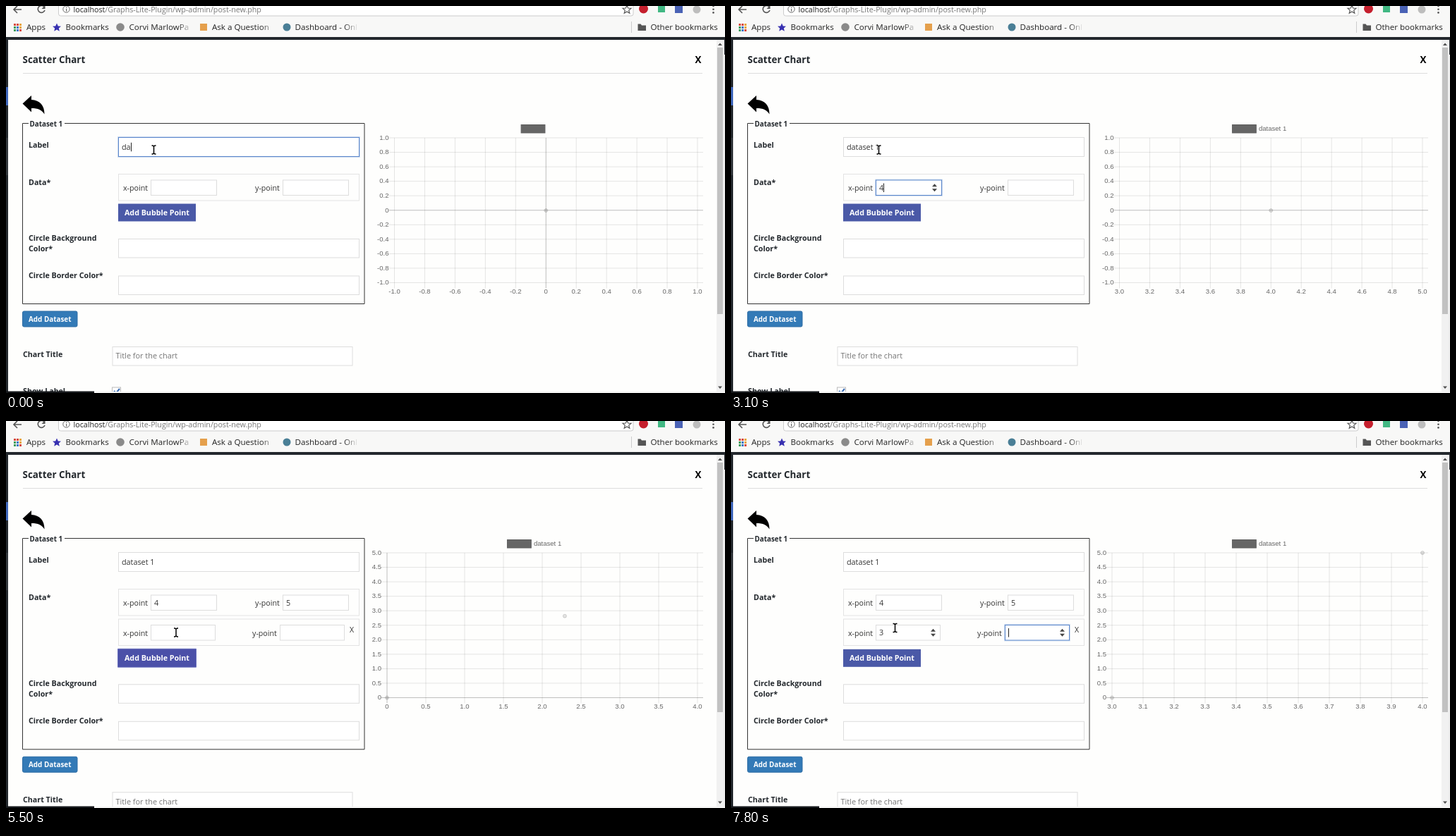
Write an HTML page that moves like this. It is 1019 px wide and 549 px high and loops after 8000 ms.

```html
<!DOCTYPE html>
<html lang="en">
<head>
<meta charset="utf-8">
<title>Scatter chart form</title>
<style>
  html, body { margin: 0; width: 100%; height: 100%; overflow: hidden; background: #fefefd; }
  svg { display: block; }
  text { font: 10.7px "Open Sans", "Noto Sans", sans-serif; fill: #333; white-space: pre; }
  .bold { font-weight: 700; fill: #23282d; }
  .bar { font-size: 11.6px; fill: #222; }
  .tick { font: 9.55px "Liberation Sans", Arial, sans-serif; fill: #666; }
</style>
</head>
<body>
<svg width="1019" height="549" viewBox="0 0 1019 549">
  <defs>
    <linearGradient id="fade">
      <stop offset="0" stop-color="#f8f8f7" stop-opacity="0"/>
      <stop offset="1" stop-color="#f8f8f7"/>
    </linearGradient>
  </defs>
  <g id="page"></g>
  <g id="browser"></g>
  <g id="pointer"></g>
</svg>
<script>
const LOOP = 8000;
const ROW_SHIFT = 43.3;
const FIELD_FONT = '10.8px "Open Sans", "Noto Sans", sans-serif';
const TICK_FONT = '9.55px "Liberation Sans", Arial, sans-serif';
const POINT_START = 5467;
const POINT_TIME = 1000;

// Each entry changes part of the state from its time on.
const steps = [
  [0, { label: 'da', legend: '', x1: '', y1: '', x2: '', focus: 'label', caret: true,
        row: false, glow: false, hover: false, spell: false,
        xAxis: [-1, 1, 10], yAxis: [-1, 1, 10], left: 550.5 }],
  [300, { label: 'dat' }],
  [400, { label: 'data' }],
  [500, { legend: 'data' }],
  [800, { label: 'datas' }],
  [900, { label: 'datase', legend: 'datase' }],
  [1100, { label: 'dataset' }],
  [1200, { legend: 'dataset' }],
  [1300, { label: 'dataset ', spell: true }],
  [1500, { label: 'dataset 1' }],
  [1700, { legend: 'dataset 1' }],
  [2000, { focus: 'x1', spell: false }],
  [2500, { caret: false }],
  [3000, { x1: '4', caret: true }],
  [3100, { xAxis: [3, 5, 10] }],
  [3400, { focus: 'y1' }],
  [4000, { caret: false }],
  [4300, { y1: '5', caret: true }],
  [4500, { yAxis: [4, 6, 10], left: 547.5 }],
  [4900, { glow: true }],
  [5300, { focus: '' }],
  [5400, { row: true }],
  [POINT_START, { xAxis: [0, 4, 8], yAxis: [0, 5, 10], left: 540 }],
  [5800, { hover: true }],
  [6000, { focus: 'x2', caret: true, glow: false }],
  [6500, { caret: false }],
  [7100, { caret: true }],
  [7500, { x2: '3' }],
  [7600, { xAxis: [3, 4, 10] }],
  [7800, { focus: 'y2' }]
];

const mousePath = [
  [0, 209.5, 204], [4500, 209.5, 204], [4700, 181, 262], [4900, 194, 288],
  [5300, 241, 300], [5700, 241, 300], [6000, 232.5, 293.5]
];

const ruler = document.createElement('canvas').getContext('2d');
function textWidth(str, font) {
  ruler.font = font;
  return ruler.measureText(str).width;
}

const rect = (x, y, w, h, fill, more = '') =>
  `<rect x="${x}" y="${y}" width="${w}" height="${h}" fill="${fill}" ${more}/>`;
const box = (x, y, w, h, stroke, fill = 'none') =>
  rect(x + .5, y + .5, w - 1, h - 1, fill, `stroke="${stroke}"`);
const line = (x1, y1, x2, y2, stroke, width = 1) =>
  `<path d="M${x1} ${y1}L${x2} ${y2}" stroke="${stroke}" stroke-width="${width}"/>`;
const text = (x, y, str, cls = '', more = '') =>
  `<text x="${x}" y="${y}" class="${cls}" ${more}>${str}</text>`;
const path = (d, fill, more = '') => `<path d="${d}" fill="${fill}" ${more}/>`;
const dot = (x, y, r, fill, more = '') =>
  `<circle cx="${x}" cy="${y}" r="${r}" fill="${fill}" ${more}/>`;
const size = px => `style="font-size:${px}px"`;

function stateAt(t) {
  return Object.assign({}, ...steps.filter(s => s[0] <= t).map(s => s[1]));
}

function mouseAt(t) {
  const i = mousePath.findIndex(p => p[0] > t);
  if (i < 0) return mousePath[mousePath.length - 1].slice(1);
  const [a, b] = [mousePath[i - 1], mousePath[i]];
  const u = (t - a[0]) / (b[0] - a[0]);
  return [1, 2].map(k => a[k] + (b[k] - a[k]) * u);
}

function field(x, y, w, h, value = '', focused = false, caret = false, spin = false) {
  const base = y + h / 2 + 3.8;
  let out = box(x, y, w, h, focused ? '#5b87cc' : '#ddd', '#fff');
  if (focused) out += rect(x - .3, y - .3, w + .6, h + .6, 'none', 'stroke="#5b87cc" stroke-opacity=".35"');
  out += text(x + 5, base, value, '', size(10.8));
  if (focused && caret) {
    const cx = Math.round(x + 5 + textWidth(value, FIELD_FONT)) + .5;
    out += line(cx, base - 10, cx, base + 2.5, '#222');
  }
  if (spin) {
    const sx = x + w - 10.5, sy = y + h / 2;
    out += path(`M${sx - 3.5} ${sy - 1.5}h7l-3.5 -4zM${sx - 3.5} ${sy + 1.5}h7l-3.5 4z`, '#444');
  }
  return out;
}

function pointRow(s, n, y) {
  const first = n === 1;
  const w = first ? 94 : 92, yx = first ? 392 : 388;
  const input = (axis, x) => {
    const key = axis + n, focused = s.focus === key;
    const spin = focused || (key === 'x2' && s.hover);
    return field(x, y + 8.5, w, 22.5, s[key], focused, s.caret, spin);
  };
  return box(159, y, 342, 38.5, '#e3e3e3') +
    text(166, y + 24, 'x-point') + input('x', 205) +
    text(yx - 39, y + 24, 'y-point') + input('y', yx) +
    (first ? '' : text(487, y + 19, 'X', '', size(10.5)));
}

function form(s) {
  const d = s.row ? ROW_SHIFT : 0;
  let out = path(`M32 166.5H23.5V${422.5 + d}H508V166.5H83`, 'none', 'stroke="#333"') +
    text(33.5, 170.5, 'Dataset 1', 'bold', size(9.85)) +
    text(32, 201, 'Label', 'bold') +
    field(159, 186, 342, 28, s.label, s.focus === 'label', s.caret);
  if (s.spell) {
    const end = 164 + textWidth('dataset', FIELD_FONT);
    out += `<path d="M164 205.5H${end}" stroke="#e33" stroke-dasharray="1.6 1"/>`;
  }
  out += text(32, 254, 'Data*', 'bold') + pointRow(s, 1, 238);
  if (s.row) out += pointRow(s, 2, 280.5);
  if (s.glow) out += rect(158, 279.5 + d, 112, 27, '#6a70bd', 'rx="1"');
  out += rect(159, 280.5 + d, 110, 25, s.glow ? '#4b50a8' : '#4a59a7') +
    text(168, 297 + d, 'Add Bubble Point', 'bold', 'style="fill:#fff"') +
    text(32, 333 + d, 'Circle Background', 'bold') +
    text(32, 347.5 + d, 'Color*', 'bold') +
    field(159, 330 + d, 342, 27.5) +
    text(32, 385.5 + d, 'Circle Border Color*', 'bold') +
    field(159, 382.5 + d, 342, 27.5) +
    rect(23.5, 433 + d, 77.5, 22, '#337ab7', 'rx="2" stroke="#2e6da4"') +
    text(32, 447.8 + d, 'Add Dataset', 'bold', 'style="fill:#fff;font-size:9.9px"') +
    text(24, 498 + d, 'Chart Title', 'bold') +
    field(150.5, 483 + d, 341, 27.5) +
    text(155.5, 500.2 + d, 'Title for the chart', '', 'style="fill:#757575;font-size:10.9px"') +
    text(24, 550 + d, 'Show Label', 'bold') +
    box(150, 540.5 + d, 13, 13, '#bbb', '#fff') +
    path(`M153 ${546 + d}l3 3 5 -6`, 'none', 'stroke="#3a6db5" stroke-width="2"');
  return out;
}

function chart(s, t) {
  const top = 187, bottom = 392.5, right = 980, { left } = s;
  const ticks = ([min, max, n]) => Array.from({ length: n + 1 }, (_, i) => {
    const v = min + (max - min) * i / n;
    const zero = Math.abs(v) < 1e-9;
    return { u: i / n, name: zero ? '0' : v.toFixed(1), ink: `rgba(0,0,0,${zero ? .25 : .1})` };
  });
  let out = '';
  for (const k of ticks(s.xAxis)) {
    const x = left + (right - left) * k.u;
    out += line(x, top, x, bottom + 8, k.ink) +
      text(x, 408, k.name, 'tick', 'text-anchor="middle"');
  }
  for (const k of ticks(s.yAxis)) {
    const y = bottom + (top - bottom) * k.u;
    out += line(left - 8, y, 988, y, k.ink) +
      text(left - 8, y + 2.8, k.name, 'tick', 'text-anchor="end"');
  }
  const x0 = 749 - (37.8 + textWidth(s.legend, TICK_FONT)) / 2;
  out += rect(x0, 168.5, 33.8, 11.5, '#666', 'stroke="#5c5c5c"') +
    text(x0 + 37.5, 177, s.legend, 'tick');

  const point = (x, y) => dot(x, y, 2.5, 'rgba(0,0,0,.1)', 'stroke="rgba(0,0,0,.14)"');
  if (t < POINT_START) return out + point(left / 2 + right / 2, 290);
  const u = Math.min(1, (t - POINT_START) / POINT_TIME);
  const ease = 1 - (1 - u) ** 4;
  return out + point(left, bottom) + point(764 + (right - 764) * ease, 290 + (top - 290) * ease);
}

function page(t) {
  const s = stateAt(t);
  return rect(0, 43, 1019, 506, '#fefefd') +
    text(23.5, 81.3, 'Scatter Chart', 'bold', size(13.4)) +
    text(976.5, 81, 'X', 'bold', 'style="font-size:13.4px;fill:#000"') +
    line(24, 95.5, 987, 95.5, '#ddd') +
    path('M23.5 138.5L36 127V133C48 133.5 54.5 141 54.5 153.5C51 147.5 45.5 145 36 145V150.5Z', '#000') +
    form(s) + chart(s, t) +
    rect(1007, 48, 10, 499, '#f1f1f1') +
    rect(1008, 59, 8, (s.row ? 413 : 437) - 59, '#c1c1c1') +
    path('M1009 56h6l-3 -3.5zM1009 539.5h6l-3 3.5z', '#505050');
}

function browser() {
  let out = rect(0, 0, 1019, 44, '#f8f8f7') +
    path('M74.5 0V11Q74.5 14 77.5 14H886Q889 14 889 11V0', '#fff', 'stroke="#ccc"') +
    path('M22 5H11M16 0L11 5L16 10', 'none', 'stroke="#555" stroke-width="1.6"') +
    path('M54 1A5 5 0 1 0 55 6', 'none', 'stroke="#555" stroke-width="1.6"') +
    path('M55.5 -1V4H50.5Z', '#555') +
    dot(85.5, 4.5, 4.7, 'none', 'stroke="#666"') + rect(85, 4, 1.2, 3.6, '#666') + rect(85, 1.6, 1.2, 1.3, '#666') +
    text(95.5, 9, '<tspan fill="#222">localhost</tspan>/Graphs-Lite-Plugin/wp-admin/post-new.php', '', 'style="fill:#777"') +
    path('M880 -1l1.7 4 4.3 .3-3.3 2.8 1.1 4.2-3.8-2.3-3.8 2.3 1.1-4.2-3.3-2.8 4.3-.3z', 'none', 'stroke="#555" stroke-width="1.2"') +
    dot(903.5, 4, 6.5, '#c51f2d') +
    rect(924, 0, 10, 9, '#41b883') +
    rect(948, 0, 11, 10, '#4a62b5') +
    dot(979, 5, 5.5, '#bdbdbd');
  for (const y of [0, 4.7, 9.4]) out += dot(1002.5, y, 1.3, '#555');

  const appColors = ['#d94b3f', '#d94b3f', '#e9a63a', '#3f9c5a', '#3b78c8', '#e9a63a', '#3f9c5a', '#3b78c8', '#d94b3f'];
  appColors.forEach((c, i) => out += rect(11 + i % 3 * 4, 25 + Math.floor(i / 3) * 4, 3, 3, c));
  out += text(29, 34, 'Apps', 'bar') +
    path('M72 24.5l1.8 3.9 4.2 .4-3.2 2.8 1 4.2-3.8-2.2-3.8 2.2 1-4.2-3.2-2.8 4.2-.4z', '#3730b0') +
    text(84.5, 34, 'Bookmarks', 'bar') +
    dot(162, 30, 5.8, '#8a8a8a') +
    text(174.5, 34, 'Corvi MarlowPa', 'bar') +
    rect(244, 22, 20, 18, 'url(#fade)') + rect(264, 22, 10, 18, '#f8f8f7') +
    rect(275, 25, 10, 10, '#e5a04c') +
    text(292, 34, 'Ask a Question', 'bar') +
    rect(362, 22, 20, 18, 'url(#fade)') +
    dot(398, 30, 5.5, '#4a7f96') +
    text(409.5, 34, 'Dashboard - Onl', 'bar') +
    rect(479, 22, 20, 18, 'url(#fade)') + rect(499, 22, 12, 18, '#f8f8f7') +
    line(886.5, 22, 886.5, 38, '#ccc') +
    path('M895.5 25.5h4l1.5 2h6v7.5h-11.5z', '#555') +
    text(913.5, 34, 'Other bookmarks', 'bar');

  return out +
    rect(0, 44, 1019, 4, '#23282d') +
    rect(0, 44, 3, 505, '#23282d') +
    rect(0, 115, 3, 26, '#3f67bd') +
    rect(0, 187, 3, 53, '#32373c') +
    rect(1017, 48, 2, 501, '#ededed') +
    rect(1018, 48, 1, 21, '#23282d') +
    rect(0, 547, 1019, 2, '#f4f4f3') +
    rect(0, 546.5, 125, 2.5, '#15171a');
}

function pointer(t) {
  const [x, y] = mouseAt(t);
  const row = stateAt(t).row;
  const within = (x0, y0, x1, y1) => x >= x0 && x <= x1 && y >= y0 && y <= y1;
  const overField = within(159, 186, 501, 214) || within(205, 247, 299, 269) || (row && within(205, 289, 297, 311));
  const overButton = !row && within(159, 280, 269, 306);
  let shape;
  if (overField) {
    const beam = 'M-3 -6h1.5L0 -4.8L1.5 -6H3M0 -5V5M-3 6h1.5L0 4.8L1.5 6H3';
    shape = path(beam, 'none', 'stroke="#fff" stroke-width="3.2"') +
      path(beam, 'none', 'stroke="#000" stroke-width="1.5"');
  } else if (overButton) {
    shape = path('M-1.5 -5Q0 -7 1.5 -5V0L6 1.2Q7.5 2 7 4L5.5 10H-2L-6 4Q-6 1.5 -4 2.5L-1.5 4.5Z', '#fff', 'stroke="#000"');
  } else {
    shape = path('M0 0V13L3 10.2L5 15L7.2 14L5.2 9.5H9.2Z', '#000', 'stroke="#fff"');
  }
  return `<g transform="translate(${x} ${y})">${shape}</g>`;
}

const shown = {};
function show(id, markup) {
  if (shown[id] === markup) return;
  shown[id] = markup;
  document.getElementById(id).innerHTML = markup;
}

const start = performance.now();
function draw(now) {
  const t = Math.max(0, now - start) % LOOP;
  show('page', page(t));
  show('pointer', pointer(t));
  requestAnimationFrame(draw);
}
show('browser', browser());
draw(start);
</script>
</body>
</html>
```
